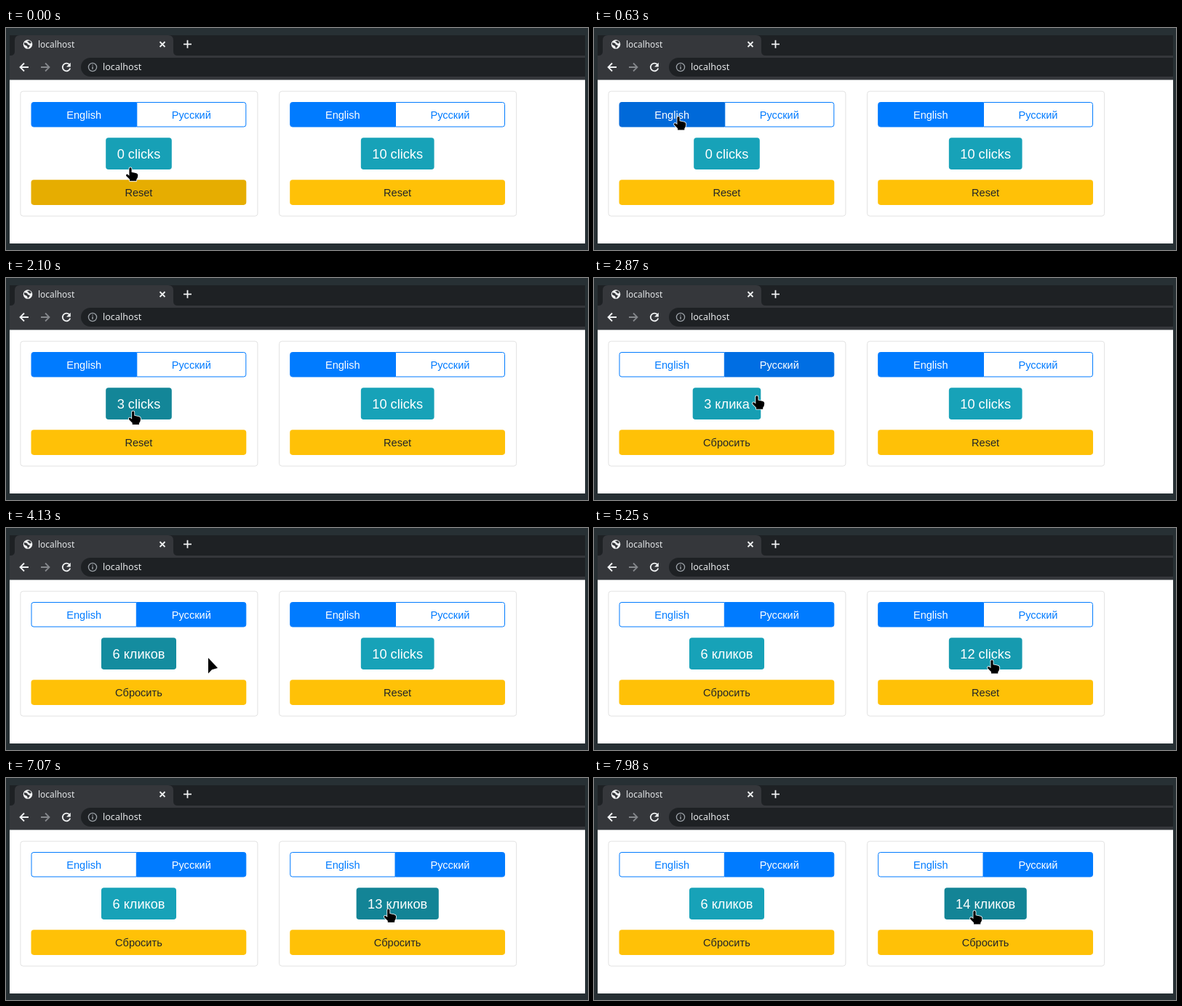
Write an HTML page that moves like this. It is 800 by 306 pixels and loops after 8 s.

```html
<!DOCTYPE html>
<html lang="en">
<head>
<meta charset="utf-8">
<title>Click counters</title>
<style>
  html, body { margin: 0; width: 100%; height: 100%; overflow: hidden; background: #273034; }
  svg { display: block; width: 800px; height: 306px; }
  text { font-family: "Liberation Sans", Arial, sans-serif; }
  .browser text { font-family: "Noto Sans", sans-serif; fill: #e6e8ea; }
  .icon { fill: none; stroke: #f1f3f4; stroke-width: 1.8; }
</style>
</head>
<body>
<svg viewBox="0 0 800 306">
  <g class="browser">
    <path fill="#1e2124" d="M5 10H796V38H5z"/>
    <path fill="#35373b" d="M5 38H796V71H5zM6 38q6 0 6-6V17q0-7 7-7H223q7 0 7 7V32q0 6 6 6z"/>
    <path fill="#1e2124" d="M796 41H116a13 13 0 0 0 0 26H796z"/>
    <path fill="#fff" d="M5 71.5H796V297H5z"/>
    <circle cx="30" cy="22.5" r="6.3" fill="#f1f3f4"/>
    <path fill="#35373b" d="M25 20l4 1 1 2 3 1-1 2-2 2-1-3-4-2zM29 18l4-.5 2 3-2 1-2-1.5z"/>
    <text x="44" y="26.5" font-size="11.9">localhost</text>
    <path class="icon" d="M211.5 19l7 7m0-7l-7 7" stroke-width="1.6"/>
    <path class="icon" d="M244 22.3h11m-5.5-5.5v11"/>
    <path class="icon" d="M31 54H19.5m5.5-5.5L19.5 54l5.5 5.5"/>
    <path class="icon" style="stroke:#85888c" d="M48 54h11.5m-5.5-5.5l5.5 5.5-5.5 5.5"/>
    <path class="icon" d="M87 50.4A5.3 5.3 0 1 0 88.2 55.4"/>
    <path fill="#f1f3f4" d="M88.8 47.8v5.8H83z"/>
    <circle class="icon" cx="119" cy="54" r="5.6" style="stroke:#9aa0a6;stroke-width:1.3"/>
    <path class="icon" style="stroke:#9aa0a6;stroke-width:1.4" d="M119 53v4m0-6.6v1.4"/>
    <text x="133" y="58.3" font-size="12.6">localhost</text>
  </g>
  <g id="panels"></g>
  <path id="cursor" stroke="#fff" stroke-width="1.6" paint-order="stroke" stroke-linejoin="round"/>
</svg>
<script>
const LOOP = 8000, STEP = 70, FADE = 150;
const BLUE = [0, 123, 255], BLUE_DARK = [0, 105, 217], WHITE = [255, 255, 255];
const TEAL = [23, 162, 184], TEAL_DARK = [19, 132, 150];
const AMBER = [255, 193, 7], AMBER_DARK = [224, 168, 0];

// Pointer path: time, x, y
const path = [
  [-50, 171, 222], [10, 171, 190], [250, 171, 190], [560, 116, 122], [900, 116, 122],
  [1140, 171, 187], [2060, 171, 187], [2340, 238, 123], [2800, 238, 123],
  [2900, 220, 173], [3080, 214, 174], [4070, 216, 178], [4130, 278, 179],
  [4620, 547, 182], [6130, 547, 182], [6250, 594, 122], [6700, 594, 122],
  [7120, 523, 183], [8000, 523, 183]
];
const panels = [
  { x: 0, start: 0, clicks: [1540, 1750, 1960, 3150, 3430, 3780], russian: 2520, focus: [700, 1500] },
  { x: 355.7, start: 10, clicks: [4830, 5210, 5530, 7490], russian: 6510, focus: [0, 0] }
];
const shapes = {
  hand: 'M-1.6 1.6Q-1.6 0 0 0T1.6 1.6V6.3L7.5 7.6Q10.5 8.3 10.3 11L9.8 14 8.3 16.5V18.5H-1V16.2L-5.7 11.6Q-6.5 10 -5.3 9.3-4.2 8.8-3.2 9.8L-1.6 11.3Z',
  arrow: 'M0 0V21.5L5 16.2 13 14Z'
};

const measure = document.createElement('canvas').getContext('2d');
measure.font = '18.2px "Liberation Sans", Arial, sans-serif';
const panelLayer = document.getElementById('panels');
const cursor = document.getElementById('cursor');

const mix = (a, b, k) => `rgb(${a.map((v, i) => Math.round(v + (b[i] - v) * k))})`;

function pointer(t) {
  const i = path.findIndex(p => p[0] > t);
  if (i < 0) return path.at(-1).slice(1);
  if (i === 0) return path[0].slice(1);
  const [t0, x0, y0] = path[i - 1], [t1, x1, y1] = path[i];
  const k = (t - t0) / (t1 - t0), e = k * k * (3 - 2 * k);
  return [x0 + (x1 - x0) * e, y0 + (y1 - y0) * e];
}

const inside = ([x, y], r) => x >= r.x && x <= r.x + r.w && y >= r.y && y <= r.y + r.h;

// Share of the fade window that the pointer spent over a box
function hover(t, box) {
  let hits = 0;
  for (let age = 0; age < FADE; age += 10) hits += inside(pointer(t - age), box);
  return hits / (FADE / 10);
}

function label(n, russian) {
  if (!russian) return `${n} ${n === 1 ? 'click' : 'clicks'}`;
  const ones = n % 10, teen = n % 100 > 10 && n % 100 < 15;
  return `${n} ${teen || ones === 0 || ones > 4 ? 'кликов' : ones === 1 ? 'клик' : 'клика'}`;
}

function layout(p, t) {
  const russian = t >= p.russian;
  const done = p.clicks.filter(c => c <= t);
  const text = label(p.start + done.length, russian);
  const w = measure.measureText(text).width + 31;
  return {
    russian, text, sinceClick: t - (done.at(-1) ?? -LOOP),
    english: { x: p.x + 34.5, y: 102, w: 145.3, h: 34.6 },
    russianTab: { x: p.x + 179.3, y: 102, w: 151, h: 34.6 },
    counter: { x: p.x + 182.5 - w / 2, y: 151.3, w, h: 43.7 },
    reset: { x: p.x + 34.5, y: 209.3, w: 295.8, h: 34.6 }
  };
}

const write = (r, text, fill, size = 14.56) =>
  `<text x="${r.x + r.w / 2}" y="${r.y + r.h / 2 + size * 0.36}" text-anchor="middle" font-size="${size}" fill="${fill}">${text}</text>`;

const button = (r, fill, text, color, size) =>
  `<rect x="${r.x}" y="${r.y}" width="${r.w}" height="${r.h}" rx="3.8" fill="${fill}"/>` + write(r, text, color, size);

function tab(r, text, active, over, left) {
  const fill = active ? mix(BLUE, BLUE_DARK, over) : mix(WHITE, BLUE, over);
  const color = active ? '#fff' : mix(BLUE, WHITE, over);
  const x = r.x + .5, y = r.y + .5, w = r.w - 1, h = r.h - 1;
  const d = left
    ? `M${x + w} ${y}H${x + 3}q-3 0-3 3v${h - 6}q0 3 3 3H${x + w}z`
    : `M${x} ${y}h${w - 3}q3 0 3 3v${h - 6}q0 3-3 3H${x}z`;
  return `<path d="${d}" fill="${fill}" stroke="${active ? fill : mix(BLUE, BLUE, 0)}"/>` + write(r, text, color);
}

function panel(p, t) {
  const s = layout(p, t);
  const focused = t >= p.focus[0] && t < p.focus[1];
  const e = s.english;
  const glow = focused
    ? `<rect x="${e.x - 1.3}" y="${e.y - 1.3}" width="${e.w + 2.6}" height="${e.h + 2.6}" rx="4" fill="none" stroke="#007bff" stroke-opacity=".5" stroke-width="2.7"/>` : '';
  const english = tab(e, 'English', !s.russian, focused ? 1 : hover(t, e), true);
  const russian = tab(s.russianTab, 'Русский', s.russian, hover(t, s.russianTab), false);
  const press = hover(t, s.counter) * Math.min(1, s.sinceClick / FADE);
  return `<rect x="${p.x + 19.9}" y="87.2" width="326" height="172" rx="3.6" fill="#fff" stroke="#dfdfdf" stroke-width=".9"/>`
    + (s.russian ? english + russian : russian + english + glow)
    + button(s.counter, mix(TEAL, TEAL_DARK, press), s.text, '#fff', 18.2)
    + button(s.reset, mix(AMBER, AMBER_DARK, hover(t, s.reset)), s.russian ? 'Сбросить' : 'Reset', '#212529');
}

function draw(now) {
  const t = Math.floor(now % LOOP / STEP) * STEP;
  panelLayer.innerHTML = panels.map(p => panel(p, t)).join('');
  const at = pointer(t);
  const clickable = panels.some(p => {
    const s = layout(p, t);
    return [s.english, s.russianTab, s.counter, s.reset].some(r => inside(at, r));
  });
  cursor.setAttribute('d', clickable ? shapes.hand : shapes.arrow);
  cursor.setAttribute('transform', `translate(${at})`);
}

const began = performance.now();
function frame() {
  draw(performance.now() - began);
  requestAnimationFrame(frame);
}
frame();
</script>
</body>
</html>
```
